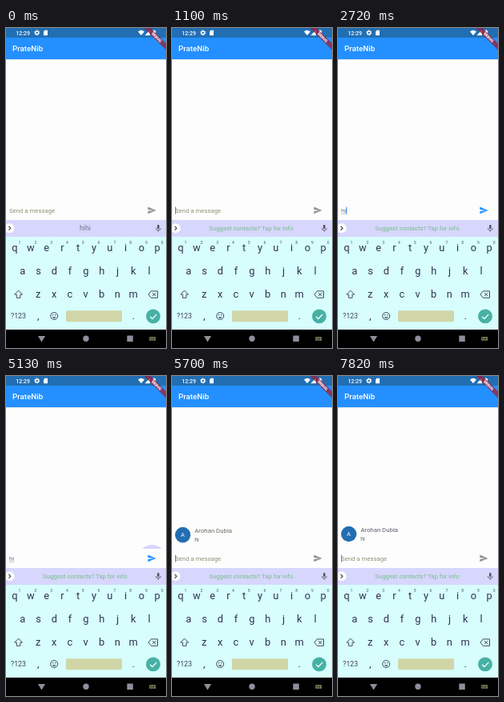
Write an HTML page that moves like this. It is 200x400 px and loops after 8 s.

```html
<!DOCTYPE html>
<html lang="en">
<head>
<meta charset="utf-8">
<title>Chat screen</title>
<style>
html, body { margin: 0; width: 100%; height: 100%; overflow: hidden; background: #fdfdfd; }
svg { display: block; }
text { font-family: Roboto, sans-serif; white-space: pre; }
#stage { width: 100%; height: 100%; }
.mid { text-anchor: middle; }
.body { font-size: 7.79px; }
#keys text { font-size: 12.8px; fill: #2f3350; text-anchor: middle; }
#keys .num { font-size: 5px; fill: #4d5468; }
</style>
</head>
<body>
<svg id="stage" viewBox="0 0 200 400">
  <rect width="200" height="400" fill="#fdfdfd"/>

  <!-- message list -->
  <svg id="row" x="0" y="216" width="200" height="0" overflow="hidden">
    <g id="msg">
      <circle cx="13.5" cy="15" r="9.7" fill="#226eb2"/>
      <text class="mid" x="13.5" y="17.7" font-size="7.4" fill="#fff">A</text>
      <text id="name" class="body" x="28.3" y="12.6">Arohan Dubla</text>
      <text x="28.3" y="23.6" font-size="6.8" fill="#5c5e58">hi</text>
    </g>
  </svg>
  <circle id="ripple" cx="182.5" cy="228" r="0" fill="#d7d6fb"/>

  <!-- input row -->
  <rect y="216" width="200" height="24" fill="#fdfdfd"/>
  <text id="hint" class="body" x="4" y="230.8" fill="#8b9470">Send a message</text>
  <text id="typed" class="body" x="4" y="230.8" fill="#6c6f74"></text>
  <rect id="line" x="4" y="232" width="6" height=".5" fill="#96989c"/>
  <rect id="caret" y="223.7" width="1" height="8.8" fill="#2b86f5"/>
  <path id="send" transform="translate(176.4 222.1) scale(.487)" d="M2 21L23 12 2 3v7l15 2-15 2z"/>

  <!-- app bar -->
  <rect y="39" width="200" height=".6" fill="#c4d6e8"/>
  <rect y="12" width="200" height="27" fill="#2490ff"/>
  <rect width="200" height="12" fill="#226eb2"/>
  <text x="8" y="29" font-size="9.74" font-weight="500" fill="#fff">PrateNib</text>
  <text x="12.3" y="8.6" font-size="7" font-weight="500" fill="#fff">12:29</text>
  <g fill="#fff">
    <circle cx="38.7" cy="5.9" r="2" fill="none" stroke="#fff" stroke-width="1.5"/>
    <circle cx="38.7" cy="5.9" r="3" fill="none" stroke="#fff" stroke-width="1" stroke-dasharray="1.5 1.64"/>
    <path d="M48.5 2.8h3.5v6.4h-5V4.4z"/>
    <path d="M165 4.4q4-3.2 8 0l-4 4.9z"/>
    <path d="M180 2.6v6.6h-6.6z"/>
    <path d="M184.2 2.4h1.6v.8h1.3v6.2h-4.2V3.2h1.3z"/>
  </g>
  <g transform="translate(200 0) rotate(45)">
    <rect x="-19.5" y="13.6" width="39" height="5.9" fill="#9c1c3c" fill-opacity=".75"/>
    <text class="mid" x="0" y="18.2" font-size="4.8" font-weight="900" fill="#fff">DEBUG</text>
  </g>

  <!-- suggestions -->
  <rect y="240" width="200" height="21" fill="#d7d6fd"/>
  <circle cx="4.5" cy="250.3" r="6" fill="#fff"/>
  <path d="M3.4 247.9l2.4 2.4-2.4 2.4" fill="none" stroke="#34383e" stroke-width="1.1"/>
  <text id="tip" class="mid" x="99" y="253.2"></text>
  <g fill="none" stroke="#505260">
    <path d="M190.3 247.3v2.8" stroke-width="2.5" stroke-linecap="round"/>
    <path d="M187.3 250a3 3 0 0 0 6 0M190.3 253v1.8" stroke-width=".8"/>
  </g>

  <!-- keyboard -->
  <rect y="261" width="200" height="116" fill="#d7fdfd"/>
  <g id="keys"></g>
  <g fill="none" stroke="#46485f" stroke-width="1">
    <path d="M15.6 328.1l4.9 5h-2.6v4.2h-4.6v-4.2h-2.6z"/>
    <path d="M181.3 328.9h8.2v8.4h-8.2l-3.2-4.2zM183.2 331.1l4 4m0-4l-4 4"/>
    <circle cx="60.2" cy="360" r="4.5"/>
    <path d="M57.6 361.3q2.6 3.4 5.2 0z" fill="#46485f" stroke="none"/>
    <path d="M58 358.7h1.3m1.8 0h1.3" stroke-width="1.3"/>
  </g>
  <text x="6" y="363.4" font-size="8.8" fill="#3f4258">?123</text>
  <rect x="75" y="353.3" width="70" height="14" rx="1.5" fill="#d0d6a8"/>
  <circle cx="184" cy="360.4" r="8.9" fill="#45b1a4"/>
  <path d="M180 360.6l2.9 2.9 5.4-5.6" fill="none" stroke="#fff" stroke-width="1.3"/>

  <!-- navigation -->
  <rect y="377" width="200" height="23"/>
  <g fill="#8e8e9c">
    <path d="M39.9 385h9.2l-4.6 7.4z"/>
    <circle cx="100" cy="388.2" r="3.7"/>
    <rect x="151.3" y="384.4" width="7.5" height="7.5" rx=".5"/>
    <rect x="179.2" y="386" width="8" height="4.8" rx=".7" fill="#85855e"/>
    <path d="M180 387.3h6.4m-6.4 1.4h6.4m-5 1.2h3.4" stroke="#000" stroke-width=".8" stroke-dasharray=".8 .6"/>
  </g>
</svg>
<script>
const LOOP = 8000, ROW_H = 33.5, BASE = 216;
const FIRST = 1970, SECOND = 2230, RIPPLE = 5060, SENT = 5290;
const $ = id => document.getElementById(id);
const clamp = v => Math.max(0, Math.min(1, v));
const ramp = (t, from, span) => clamp((t - from) / span);
const set = (id, attrs) => {
  for (const k in attrs) $(id).setAttribute(k, attrs[k]);
};

function key(label, x, y, cls) {
  const el = document.createElementNS("http://www.w3.org/2000/svg", "text");
  el.setAttribute("x", x);
  el.setAttribute("y", y);
  if (cls) el.setAttribute("class", cls);
  el.textContent = label;
  $("keys").append(el);
}
const PITCH = 19.8;
[["qwertyuiop", 11, 279], ["asdfghjkl", 20.7, 307.7], ["zxcvbnm", 40.3, 336.6]]
  .forEach(([chars, x, y]) => [...chars].forEach((c, i) => key(c, x + i * PITCH, y)));
[..."1234567890"].forEach((c, i) => key(c, 17 + i * PITCH, 269.6, "num"));
key(",", 40.3, 364.4);
key(".", 159.3, 364.4);

// caret states: [start, visible]
const blink = [
  [0, 0], [880, 1], [3220, 0], [3710, 1], [4220, 0], [4710, 1], [4920, 0],
  [SENT, 1], [5830, 0], [6660, 1], [7320, 0], [7820, 1]
];

function draw(t) {
  const typed = t < FIRST || t >= SENT ? "" : t < SECOND ? "h" : "hi";
  const width = [0, 4.3, 6.2][typed.length];
  $("typed").textContent = typed;
  set("line", { width });
  set("caret", { x: 4 + width, opacity: blink.filter(b => b[0] <= t).pop()[1] });
  set("send", { fill: typed ? "#2490ff" : "#909196" });
  set("hint", { opacity: t < SENT ? 1 - ramp(t, FIRST, 200) : ramp(t, SENT, 200) });

  const early = t < 880;
  $("tip").textContent = early ? "hihi" : "Suggest contacts? Tap for info";
  set("tip", { fill: early ? "#70748a" : "#74bd8a", "font-size": early ? 8.8 : 7.75 });

  set("ripple", {
    r: t < RIPPLE ? 0 : 12 + 5 * ramp(t, RIPPLE, 70),
    opacity: 1 - ramp(t, SENT, 120)
  });

  const grow = 1 - Math.pow(1 - ramp(t, 5250, 600), 2);
  const h = ROW_H * grow;
  set("row", { y: BASE - h, height: h });
  set("msg", { transform: `translate(0 ${(h - ROW_H) / 2})` });
  set("name", { fill: t < 6330 ? "#666d5c" : "#5a5e6a" });
}

const start = performance.now();
function tick() {
  draw((performance.now() - start) % LOOP);
  requestAnimationFrame(tick);
}
tick();
</script>
</body>
</html>
```
